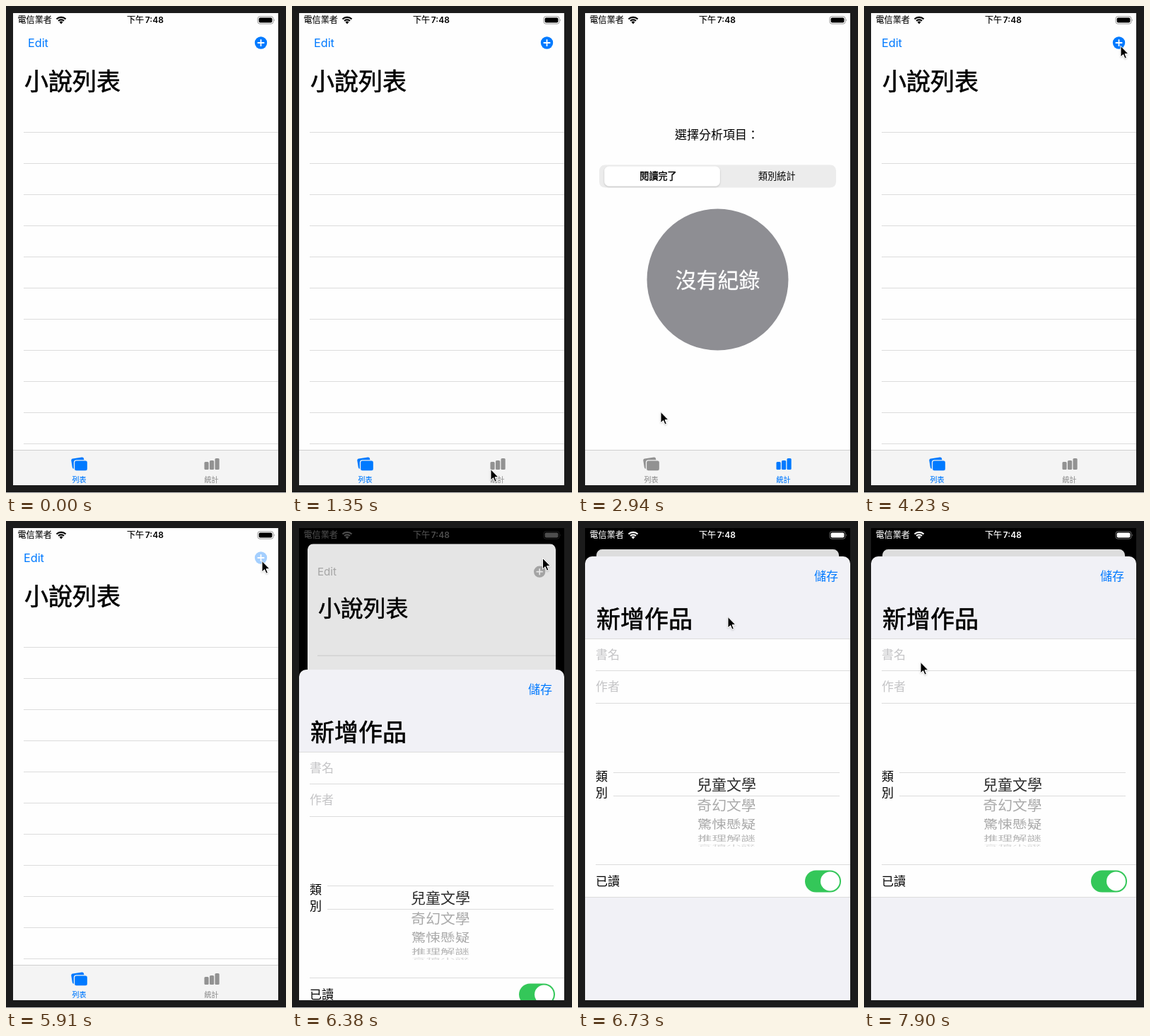
These frames come from a looping animation (396 px wide and 688 px high, 8 s). An HTML page:

```html
<!DOCTYPE html>
<html lang="zh-TW">
<head>
<meta charset="utf-8">
<title>小說列表</title>
<style>
  html, body { margin: 0; width: 100%; height: 100%; overflow: hidden; background: #1b1b1b; }
  svg { display: block; width: 100vw; height: 100vh; }
  text { font-family: Inter, "Noto Sans CJK TC", "Noto Sans CJK", sans-serif; }
  #card { --tint: #007aff; }
</style>
</head>
<body>
<svg viewBox="0 0 396 688">
  <defs>
    <clipPath id="screenClip"><rect x="10" y="10" width="375" height="667"/></clipPath>
    <clipPath id="cardClip"><rect id="cardShape" x="10" y="10" width="375" height="667"/></clipPath>
    <clipPath id="wheelClip"><rect x="150" y="257" width="120" height="203"/></clipPath>
    <filter id="soft" x="-50%" y="-50%" width="200%" height="200%">
      <feDropShadow dx="0" dy="1" stdDeviation="1.2" flood-opacity=".22"/>
    </filter>
  </defs>
  <rect width="396" height="688" fill="#1b1b1b"/>
  <rect y="687" width="396" height="1" fill="#c8c8c8"/>
  <g clip-path="url(#screenClip)">
    <rect x="10" y="10" width="375" height="667"/>
    <g id="card" clip-path="url(#cardClip)">
      <rect x="10" y="10" width="375" height="667" fill="#fefefe"/>
      <g id="list"></g>
      <g id="stats"></g>
      <g id="tabs"></g>
      <rect id="dim" x="10" y="10" width="375" height="667" opacity="0"/>
    </g>
    <g id="status"></g>
    <g id="sheet"></g>
  </g>
  <path id="cursor" d="M0 0V15.6L3.6 12.2L6 17.8L8.4 16.8L6 11.3H11Z"
        stroke="#fff" stroke-width="1" stroke-linejoin="round" filter="url(#soft)"/>
</svg>
<script>
const LOOP = 8000;
const BLUE = '#007aff', GRAY = '#929292', LINE = '#dcdcdc';
const $ = id => document.getElementById(id);

// Screen refreshes: first time, last time, number of steps
const REFRESH = [
  [600, 1350, 14], [1530, 1880, 7], [2170, 2940, 13], [3000, 3760, 12],
  [3820, 4000, 3], [4180, 4230, 2], [5910, 6380, 7], [6440, 6670, 5],
  [6730, 7080, 6], [7260, 7370, 3], [7540, 7600, 2], [7840, 7900, 2]
];

// Pointer path: time, x, y
const POINTER = [
  [600, 11, 128], [1350, 281, 655], [1530, 281, 655], [1880, 280, 240],
  [2300, 280, 240], [2580, 116, 240], [2660, 115, 240], [2940, 117, 574],
  [3180, 103, 653], [3260, 103, 653], [3760, 345, 56], [3820, 343, 48],
  [3910, 350, 38], [4000, 366, 59], [4180, 365, 59], [4230, 363, 57],
  [5910, 362, 57], [6380, 354.5, 53], [6440, 352, 55], [6730, 212, 136],
  [7080, 22, 222], [7260, 23, 223], [7370, 29, 224], [7540, 52, 216],
  [7600, 76, 209], [7840, 78, 204], [7900, 80, 200]
];

const STATS_AT = 1530, LIST_AT = 3260, RIGHT_AT = 2150, LEFT_AT = 2640;
const PRESS_AT = 5910, SHEET_AT = 6219, SHEET_DONE = 6730;

function add(parent, tag, attrs, content) {
  const el = document.createElementNS('http://www.w3.org/2000/svg', tag);
  for (const k in attrs) el.setAttribute(k, attrs[k]);
  if (content) el.textContent = content;
  return parent.appendChild(el);
}

// Text placed by the middle of its glyphs; weight is an outline width
function label(parent, str, x, mid, size, fill = '#000', weight = 0, anchor = 'start') {
  return add(parent, 'text', {
    x, y: mid + size * .365, 'font-size': size, 'text-anchor': anchor,
    fill, stroke: fill, 'stroke-width': weight
  }, str);
}

const box = (parent, x, y, width, height, rx, fill) =>
  add(parent, 'rect', { x, y, width, height, rx, fill });
const rule = (parent, x, y, end = 385, fill = LINE) => box(parent, x, y, end - x, 1, 0, fill);

function buildStatus(g) {
  label(g, '電信業者', 16.5, 20, 12.1, 'currentColor', .1);
  for (const r of [9.2, 5.6]) {
    const d = r * .707;
    add(g, 'path', {
      d: `M${78 - d} ${25 - d}A${r} ${r} 0 0 1 ${78 + d} ${25 - d}`,
      fill: 'none', stroke: 'currentColor', 'stroke-width': 2.2
    });
  }
  add(g, 'path', { d: 'M78 25.4L75.5 22.6A3.6 3.6 0 0 1 80.5 22.6Z', fill: 'currentColor' });
  label(g, '下午', 171, 20, 12.1, 'currentColor', .2);
  add(g, 'text', { x: 196.8, y: 24.4, 'font-size': 12, 'font-weight': 600, fill: 'currentColor' }, '7:48');
  add(g, 'rect', {
    x: 356, y: 14.8, width: 22, height: 10.4, rx: 3,
    fill: 'none', stroke: 'currentColor', 'stroke-opacity': .4
  });
  box(g, 357.6, 16.4, 18.8, 7.2, 1.8, 'currentColor');
  add(g, 'path', { d: 'M379.3 18.2Q381 20 379.3 21.8Z', fill: 'currentColor', opacity: .45 });
}

function buildList(g) {
  const edit = add(g, 'text', { y: 58, 'font-size': 16.2, fill: 'var(--tint)' }, 'Edit');
  const plus = add(g, 'g', {});
  add(plus, 'circle', { cx: 360.5, cy: 52, r: 8.7, fill: 'var(--tint)' });
  add(plus, 'path', {
    d: 'M356.3 52H364.7M360.5 47.8V56.2',
    stroke: '#fff', 'stroke-width': 1.8, 'stroke-linecap': 'round'
  });
  label(g, '小說列表', 26, 107, 34, '#000', .6);
  for (let y = 178; y < 627; y += 44) rule(g, 25, y);
  return { edit, plus };
}

function buildStats(g) {
  label(g, '選擇分析項目：', 137, 182, 17);
  box(g, 30, 224.5, 335, 32, 8, '#ececec');
  const thumb = box(g, 32.5, 226.5, 163.5, 28, 6.5, '#fff');
  thumb.setAttribute('filter', 'url(#soft)');
  const names = ['閱讀完了', '類別統計'].map((s, i) =>
    label(g, s, 113.5 + i * 167.8, 240.7, 13.1, '#000', 0, 'middle'));
  add(g, 'circle', { cx: 197.5, cy: 386.5, r: 100, fill: '#8e8e93' });
  label(g, '沒有紀錄', 197.5, 386.8, 30, '#fff', .25, 'middle');
  return { thumb, names };
}

function buildTabs(g) {
  box(g, 10, 627, 375, 50, 0, '#f4f4f4');
  rule(g, 10, 627, 385, '#cfcfcf');
  const list = add(g, 'g', {}), stats = add(g, 'g', {});
  box(list, 93, 638.5, 18, 14.5, 2.5, 'currentColor').setAttribute('transform', 'rotate(-9 102 646)');
  const front = box(list, 96.5, 641.8, 19, 15.2, 3, 'currentColor');
  front.setAttribute('stroke', '#f4f4f4');
  front.setAttribute('stroke-width', 1.3);
  label(list, '列表', 103.5, 669.5, 10, 'currentColor', .15, 'middle');
  [644, 642, 639].forEach((y, i) => box(stats, 280.5 + i * 7.5, y, 6.2, 655 - y, 1.5, 'currentColor'));
  label(stats, '統計', 290.5, 669.5, 10, 'currentColor', .15, 'middle');
  return { list, stats };
}

function buildSheet(g) {
  box(g, 10, 50, 375, 680, 10, '#f1f1f6');
  label(g, '儲存', 334, 78, 17, BLUE);
  label(g, '新增作品', 26, 139, 34, '#000', .6);
  box(g, 10, 166, 375, 366, 0, '#fefefe');
  rule(g, 10, 166);
  rule(g, 25, 211);
  rule(g, 25, 257);
  rule(g, 25, 485);
  rule(g, 10, 531);
  label(g, '書名', 25, 188.5, 17, '#c4c4c6');
  label(g, '作者', 25, 234, 17, '#c4c4c6');
  label(g, '類', 25, 361, 17);
  label(g, '別', 25, 383.5, 17);
  rule(g, 50, 355, 370);
  rule(g, 50, 388, 370);

  // Picker rows lie on a wheel, 20 degrees apart
  const wheel = add(g, 'g', { 'clip-path': 'url(#wheelClip)' });
  const inks = ['#2c2c2c', '#a9a9a9', '#a9a9a9', '#b5b5b5', '#d2d2d2'];
  ['兒童文學', '奇幻文學', '驚悚懸疑', '推理解謎', '言情小說'].forEach((s, i) => {
    const a = i * Math.PI / 9;
    const row = label(wheel, s, 0, 0, 21, inks[i], 0, 'middle');
    row.setAttribute('transform',
      `translate(210 ${372 + 88 * Math.sin(a)}) scale(${1 - .008 * i} ${Math.cos(a)})`);
  });

  label(g, '已讀', 25, 509, 17);
  box(g, 321, 493.5, 51, 31, 15.5, '#34c759');
  add(g, 'circle', { cx: 356.5, cy: 509, r: 13.5, fill: '#fff' });
}

buildStatus($('status'));
const list = buildList($('list'));
const stats = buildStats($('stats'));
const tabs = buildTabs($('tabs'));
buildSheet($('sheet'));

const clamp = v => Math.max(0, Math.min(1, v));
const mix = (a, b, u) => a + (b - a) * u;
const smooth = u => u * u * (3 - 2 * u);
const show = (el, on) => el.setAttribute('visibility', on ? 'visible' : 'hidden');

// Critically damped spring from 0 to 1
function spring(ms, rate) {
  const x = Math.max(0, ms) * rate;
  return 1 - (1 + x) * Math.exp(-x);
}

function refreshTime(t) {
  let shown = 0;
  for (const [a, b, n] of REFRESH) {
    if (t < a) break;
    const step = (b - a) / (n - 1);
    shown = Math.min(b, a + Math.floor((t - a) / step + 1e-6) * step);
  }
  return shown;
}

function pointerAt(t) {
  const i = POINTER.findIndex(k => k[0] > t);
  if (i < 0) return POINTER[POINTER.length - 1].slice(1);
  if (i === 0) return null;
  const [ta, xa, ya] = POINTER[i - 1], [tb, xb, yb] = POINTER[i];
  const u = smooth((t - ta) / (tb - ta));
  return [mix(xa, xb, u), mix(ya, yb, u)];
}

function draw(t) {
  const onStats = t >= STATS_AT && t < LIST_AT;
  show($('list'), !onStats);
  show($('stats'), onStats);
  tabs.list.setAttribute('color', onStats ? GRAY : BLUE);
  tabs.stats.setAttribute('color', onStats ? BLUE : GRAY);
  list.edit.setAttribute('x', t < LIST_AT ? 31 : 25);

  const side = spring(t - RIGHT_AT, .018) - spring(t - LEFT_AT, .018);
  stats.thumb.setAttribute('x', 32.5 + 166.5 * side);
  const picked = t >= RIGHT_AT && t < LEFT_AT ? 1 : 0;
  stats.names.forEach((n, i) => n.setAttribute('stroke-width', i === picked ? .4 : 0));

  const pressed = t >= PRESS_AT && t < SHEET_AT;
  list.plus.setAttribute('opacity', pressed ? .35 : 1);

  const p = t >= SHEET_DONE ? 1 : spring(t - SHEET_AT, .01655);
  const s = 1 - .0853 * p;
  const g = clamp(p * 1.4);
  $('card').setAttribute('transform', `translate(${197.5 * (1 - s)} ${10 + 30 * p - 10 * s}) scale(${s})`);
  $('card').style.setProperty('--tint', `rgb(${mix(0, 182, g)},${mix(122, 182, g)},${mix(255, 182, g)})`);
  $('cardShape').setAttribute('rx', 9 * clamp(p * 2));
  $('dim').setAttribute('opacity', .13 * p);
  const ink = 255 * p ** 4;
  $('status').setAttribute('color', `rgb(${ink},${ink},${ink})`);
  show($('sheet'), p > 0);
  $('sheet').setAttribute('transform', `translate(0 ${627 * (1 - p)})`);

  const at = pointerAt(t);
  show($('cursor'), at);
  if (at) $('cursor').setAttribute('transform', `translate(${at[0]} ${at[1] - .6})`);
}

const start = performance.now();
function tick() {
  draw(refreshTime((performance.now() - start) % LOOP));
  requestAnimationFrame(tick);
}
tick();
</script>
</body>
</html>
```
